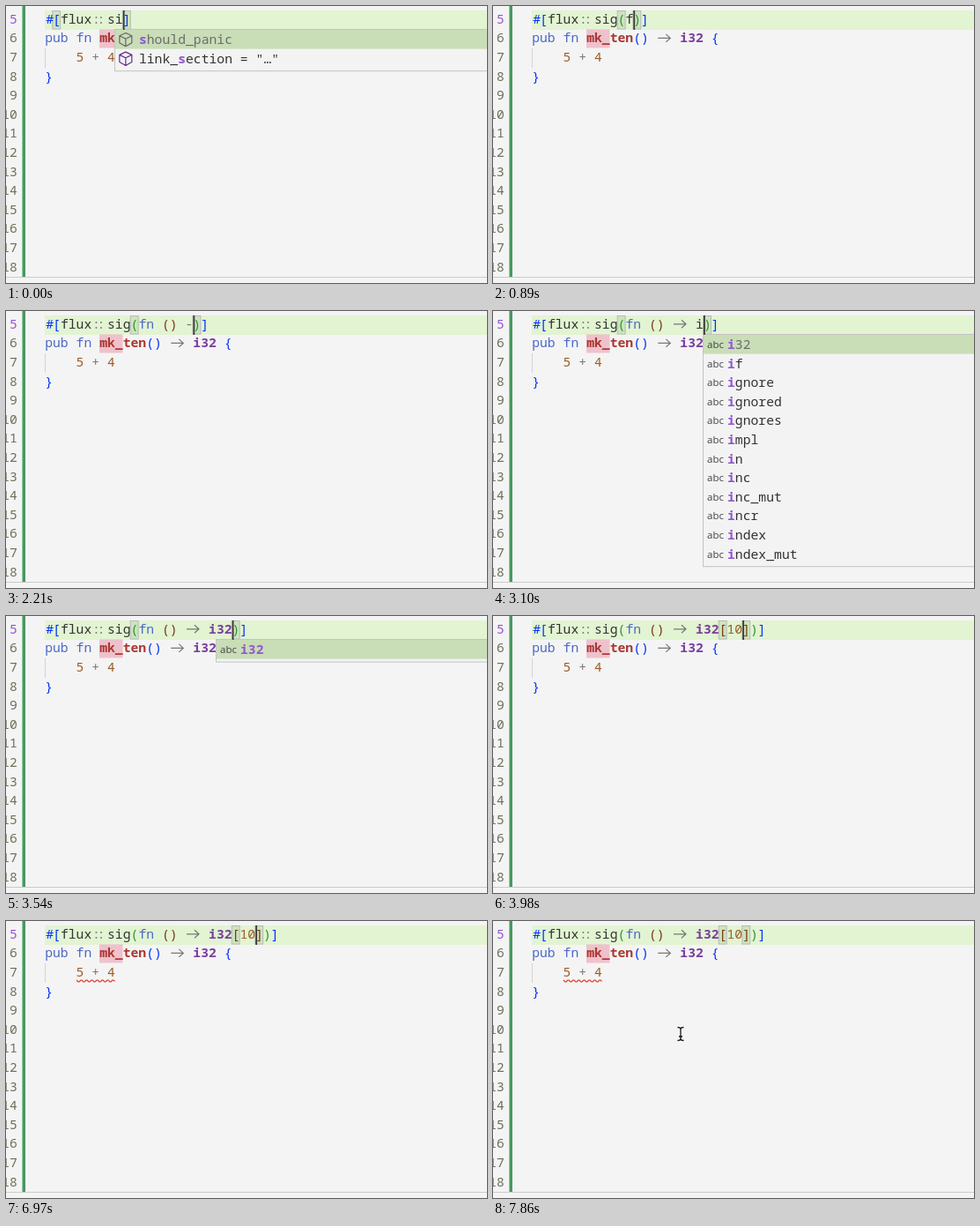
Write an HTML page that moves like this. It is 546 px wide and 314 px high and loops after 8 s.

```html
<!DOCTYPE html>
<html lang="en">
<head>
<meta charset="utf-8">
<title>Typing a signature</title>
<style>
  html, body { margin: 0; width: 100%; height: 100%; overflow: hidden; background: #f4f4f4; }
  svg { display: block; width: 546px; height: 314px; }
  text { font: 450 14.74px "Noto Sans Mono", "DejaVu Sans Mono", monospace; fill: #333; }
  .bold { font-weight: 700; }
  .abc { font: 11.5px "Open Sans", "Noto Sans", sans-serif; fill: #444; }
</style>
</head>
<body>
<svg viewBox="0 0 546 314">
  <defs>
    <path id="beam" fill="none"
      d="M-3.5 -7.5Q0 -7.5 0 -5.5Q0 -7.5 3.5 -7.5M0 -5.5V5.5M-3.5 7.5Q0 7.5 0 5.5Q0 7.5 3.5 7.5M-2 3H2"/>
  </defs>
  <rect width="546" height="314" fill="#f4f4f4"/>
  <rect x="44" y="5" width="502" height="22" fill="#e2f4d2"/>
  <rect x="18.5" width="3.5" height="307" fill="#48985d"/>
  <rect x="106" y="26.5" width="26.5" height="21" fill="#efc1cc"/>
  <path d="M44.5 48V70" stroke="#d2d2d2"/>
  <path d="M0 307.5H546" stroke="#cbcbcb"/>
  <g id="numbers"></g>
  <g id="body"></g>
  <path id="squiggle" fill="none" stroke="#e03a2c" stroke-width="1.1" stroke-linejoin="round"/>
  <g id="line"></g>
  <g id="popup"></g>
  <rect id="caret" y="5" width="1.8" height="22" fill="#3c3638"/>
  <g id="mouse">
    <use href="#beam" stroke="#fff" stroke-width="3"/>
    <use href="#beam" stroke="#111" stroke-width="1.3"/>
  </g>
</svg>
<script>
const LOOP = 8000, ADVANCE = 8.85, ROW = 21.6, LEFT = 44.2;
const $ = id => document.getElementById(id);
const colX = col => LEFT + ADVANCE * col;
const rowY = row => 19.8 + ROW * row;
const text = (x, y, s, color, attrs = "") =>
  `<text x="${x}" y="${y}" style="fill:${color}" ${attrs}>${s}</text>`;

const BRACKETS = ["#0431fa", "#319331", "#7b3814"];
const TOKEN = /#|::|->|\b(?:pub|fn)\b|\bi32\b|\bmk_ten\b|\b\d+\b|[()[\]{}]|[-+]|\w+/g;

function arrow(x, y) {
  return `<path d="M${x + 1.5} ${y - 5}h14m-5 -4.5l5 4.5l-5 4.5" fill="none" stroke="#777" stroke-width="1.2"/>`;
}

function highlight(code, row) {
  const y = rowY(row);
  let depth = 0, out = "";
  for (const { 0: token, index } of code.matchAll(TOKEN)) {
    const x = colX(index);
    const paint = (color, bold) => text(x, y, token, color, bold ? 'class="bold"' : "");
    if (token === "->") out += arrow(x, y);
    else if (token === "::") out += [.8, 6.2].map(dx => text(x + dx, y, ":", "#777")).join("");
    else if (token === "#") out += text(x + 1, y, token, BRACKETS[0]);
    else if ("([{".includes(token)) out += paint(BRACKETS[depth++ % 3]);
    else if (")]}".includes(token)) out += paint(BRACKETS[(depth = Math.max(0, depth - 1)) % 3]);
    else if (/^(pub|fn)$/.test(token)) out += paint("#4b69c6");
    else if (token === "i32") out += paint("#7a3e9d", true);
    else if (token === "mk_ten") out += paint("#aa3731", true);
    else if (/^\d+$/.test(token)) out += paint("#9c5d27");
    else if (/^[-+]$/.test(token)) out += paint("#777");
    else out += paint("#333");
  }
  return out;
}

function partner(code, close) {
  let depth = 0;
  for (let i = close; i >= 0; i--) {
    if (")]}".includes(code[i])) depth++;
    if ("([{".includes(code[i]) && --depth === 0) return i;
  }
  return -1;
}

const matchBox = col =>
  `<rect x="${colX(col) - .3}" y="5.5" width="${ADVANCE}" height="20.6" fill="#006400" fill-opacity=".1" stroke="#b9b9b9"/>`;

function cube(x, y, color) {
  return `<path transform="translate(${x} ${y})" fill="none" stroke="${color}" stroke-width="1.2" stroke-linejoin="round"
    d="M0 -7.5L7 -4.2V3.8L0 7.8L-7 3.8V-4.2ZM-7 -4.2L0 -.8L7 -4.2M0 -.8V7.8"/>`;
}

function label(word, typed) {
  let next = 0;
  return [...word].map(ch => ch === typed[next]
    ? (next++, `<tspan class="bold" style="fill:#9257d0">${ch}</tspan>`) : ch).join("");
}

function drawPopup({ col, typed, words, cubes }) {
  const x = colX(col) - .4, height = words.length * ROW + 4;
  let out = `<rect x="${x}" y="26.5" width="600" height="${height}" fill="#f3f3f3" stroke="#c4c4c4"/>
    <rect x="${x + .5}" y="27" width="600" height="${ROW}" fill="#c9ddb7"/>`;
  words.forEach((word, i) => {
    const y = 43 + ROW * i;
    out += cubes ? cube(x + 12.4, y - 5, i ? "#652d90" : "#666")
                 : text(x + 4.5, y - 1, "abc", "#444", 'class="abc"');
    out += text(x + 27.5, y, label(word, typed), i ? "#333" : "#6c6c6c");
  });
  return out;
}

const attrs = { col: 9, typed: "s", cubes: true, words: ["should_panic", 'link_section = "…"'] };
const fnWords = { col: 13, typed: "fn", words: ["fn", "fn_mut", "from_fn"] };
const iWords = {
  col: 22, typed: "i",
  words: "i32 if ignore ignored ignores impl in inc inc_mut incr index index_mut".split(" ")
};
const only = typed => ({ col: 22, typed, words: ["i32"] });

// [time, text before the caret, text after it, popup, stale bracket match]
const STEPS = [
  [0, "si", "]", attrs],
  [150, "sig", "]", attrs],
  [300, "sig", "]"],
  [590, "sig(", ")]", null, true],
  [740, "sig(", ")]"],
  [890, "sig(f", ")]"],
  [1030, "sig(fn", ")]", fnWords],
  [1180, "sig(fn ", ")]"],
  [1620, "sig(fn ()", ")]"],
  [2070, "sig(fn () ", ")]"],
  [2210, "sig(fn () -", ")]"],
  [2510, "sig(fn () ->", ")]"],
  [2650, "sig(fn () -> ", ")]"],
  [3100, "sig(fn () -> i", ")]", iWords],
  [3390, "sig(fn () -> i3", ")]", only("i3")],
  [3540, "sig(fn () -> i32", ")]", only("i32")],
  [3690, "sig(fn () -> i32[", "])]"],
  [3830, "sig(fn () -> i32[1", "])]"],
  [3980, "sig(fn () -> i32[10", "])]"]
];
const CARET_OFF = [[4580, 5030], [5470, 6070], [6520, 6970], [7420, LOOP]];
const MOUSE = [[7270, 538, 161], [7420, 422, 158], [7570, 304, 141], [7710, 236, 131], [7860, 213, 128]];

const latest = (list, t) => list.filter(item => item[0] <= t).pop();

$("numbers").innerHTML = Array.from({ length: 14 }, (_, i) =>
  text(12.8, rowY(i), i + 5, i ? "#6d705b" : "#9257d0", 'text-anchor="end"')).join("");
$("body").innerHTML = ["pub fn mk_ten() -> i32 {", "    5 + 4", "}"]
  .map((code, i) => highlight(code, i + 1)).join("");
$("squiggle").setAttribute("d", "M80 67" + "l2 2h1l2 -2h1".repeat(7) + "l1.5 1.5");

let shown;
function showStep(step) {
  if (step === shown) return;
  shown = step;
  const [, before, after, popup, stale] = step;
  const head = "#[flux::" + before, code = head + after;
  const close = stale ? code.length - 1 : head.length;
  $("line").innerHTML = matchBox(close) + matchBox(partner(code, close)) + highlight(code, 0);
  $("popup").innerHTML = popup ? drawPopup(popup) : "";
  $("caret").setAttribute("x", colX(head.length) + .1);
}

function render(t) {
  showStep(latest(STEPS, t));
  const hidden = CARET_OFF.some(([from, to]) => t >= from && t < to);
  $("caret").style.display = hidden ? "none" : "";
  $("squiggle").style.display = t >= 5620 ? "" : "none";
  const mouse = latest(MOUSE, t);
  $("mouse").style.display = mouse ? "" : "none";
  if (mouse) $("mouse").setAttribute("transform", `translate(${mouse[1]} ${mouse[2]})`);
}

const start = performance.now();
function tick() {
  render((performance.now() - start) % LOOP);
  requestAnimationFrame(tick);
}
tick();
</script>
</body>
</html>
```
